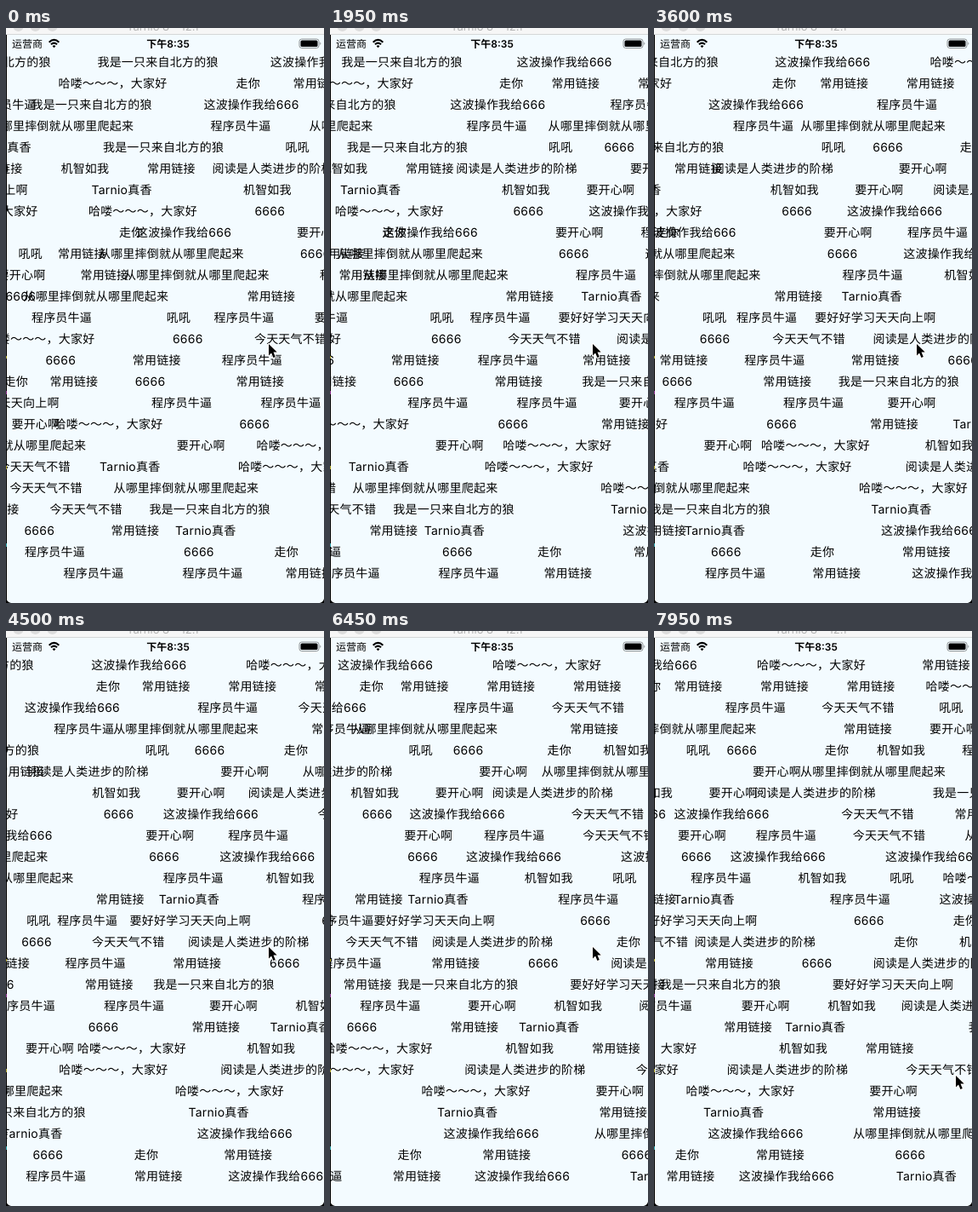
Write an HTML page that moves like this. It is 374 by 675 pixels and loops after 8000 ms.

```html
<!DOCTYPE html>
<html lang="zh-CN">
<head>
<meta charset="utf-8">
<title>弹幕</title>
<style>
  html, body { margin: 0; width: 100%; height: 100%; overflow: hidden; background: #f3fbff; }
  svg { display: block; width: 374px; height: 675px; }
  text {
    font-family: Inter, "Noto Sans CJK SC", "Noto Sans CJK", sans-serif;
    fill: #000; white-space: pre; text-rendering: geometricPrecision;
  }
  #lanes text { font-size: 14px; letter-spacing: .24px; }
</style>
</head>
<body>
<svg viewBox="0 0 374 675" xmlns="http://www.w3.org/2000/svg">
  <defs><clipPath id="screen"><rect x="1" y="8" width="373" height="667"/></clipPath></defs>
  <rect width="374" height="675" fill="#f3fbff"/>

  <!-- window bar -->
  <rect width="374" height="7.5" fill="#f6f6f6"/>
  <rect y="7" width="374" height="1" fill="#d5d7d8"/>
  <g fill="#dcdcdc">
    <circle cx="14.5" cy="-2" r="6"/><circle cx="34.5" cy="-2" r="6"/><circle cx="54.5" cy="-2" r="6"/>
  </g>
  <text x="142" y="3" font-size="13" style="fill:#b4b4b4">Tarnio 8 - 12.1</text>

  <g id="lanes" clip-path="url(#screen)"></g>

  <!-- status bar -->
  <text x="7" y="22.5" font-size="12">运营商</text>
  <text x="190.5" y="22.5" font-size="12" font-weight="600" text-anchor="middle">下午8:35</text>
  <g fill="none" stroke="#000" stroke-width="2.2">
    <path d="M50.700 16.700Q56.500 11 62.300 16.700"/>
    <path d="M53 19.300Q56.500 16 60 19.300"/>
  </g>
  <path d="M54.600 21.200Q56.500 19.500 58.400 21.200L56.500 23.200Z"/>
  <rect x="345" y="13" width="23" height="10.5" rx="2.7" fill="none" stroke="#8c9092"/>
  <rect x="346.5" y="14.5" width="20" height="7.5" rx="1.5"/>
  <path d="M369.300 16.500Q371.500 18.200 369.300 20Z" fill="#8c9092"/>

  <!-- screen edge -->
  <rect y="8" width="1" height="667"/>
  <path d="M0 669Q1 674 6 675H0ZM374 670Q373 674 369 675H374Z"/>
  <g>
    <rect y="385" width="1" height="3" fill="#a89b20"/>
    <rect y="426" width="1" height="4" fill="#8a2a8a"/>
    <rect y="514" width="1" height="4" fill="#a89b20"/>
    <rect y="605" width="1" height="4" fill="#2aa0a8"/>
  </g>

  <path id="cursor" d="M0 0V13.500L3.100 10.500L5.400 16L7.800 15L5.500 9.600H9.700Z"
        stroke="#fff" stroke-width="2" stroke-linejoin="round" paint-order="stroke"/>
</svg>
<script>
const LOOP = 8000, STEP = 150;

const phrases = {
  A: '我是一只来自北方的狼', B: '这波操作我给666', C: '哈喽～～～，大家好',
  D: '走你', E: '常用链接', F: '程序员牛逼', G: '从哪里摔倒就从哪里爬起来',
  H: '吼吼', I: '6666', J: '机智如我', K: '阅读是人类进步的阶梯',
  L: 'Tarnio真香', M: '要开心啊', N: '今天天气不错', O: '要好好学习天天向上啊'
};

// One string per lane: phrase key and its left edge at time zero.
const lanes = [
  'A-89 A108 B311.3 C493.5 E629.7',
  'C62 D271 E338 E439.5 E541 C692',
  'F-35 A30 B233 F410 N535 H626.5',
  'G-20 F241 G357 E537.5 M638.5',
  'L-41 A114.5 H329 I400 D492 J576.5 F688.5',
  'E-37 J65 E166.5 K243 M430.5 G579.5',
  'O-116 L101 J279.5 M379 K502.5 A712',
  'C-90 C97.5 I293 B396 N558 E668',
  'D133.5 B153.5 M342.5 F446 N571.5 G773',
  'H15 E61.5 G109.5 I346.5 B462.3 B644.5',
  'M-10 E88 G139.5 F369.5 J484 H568.7 C712',
  'I0 G21 E284 L384.3 F533 B708',
  'F30.5 H189.3 F245 O363.3 I549.5 D643',
  'C-23 I196.5 N292.5 K431.7 D573.3 J673.5',
  'I47 E149.3 F254.3 E374.5 I488.3 K642',
  'D-2 E52 I152.3 E271 A391 O594',
  'O-79 F171.7 F300 M417.3 J518.7 K675',
  'M7 C57 I275 E396.7 L515 A754',
  'G-76 M201.3 C295 J461.5 E563.3',
  'N-9 L110.7 C273.5 K470 N634',
  'N5 G127 C410 M567.7',
  'E-41 N52 A169 L419 E571.7',
  'I22 E124 L199.7 B436 G641.5',
  'F22.5 I209.7 D316 E434.5 I598',
  'F68 F208 E329 B472.3 L645.7'
];

const group = document.getElementById('lanes');
const cursor = document.getElementById('cursor');

function addItem(code, lane) {
  const label = phrases[code[0]];
  const node = document.createElementNS('http://www.w3.org/2000/svg', 'text');
  node.textContent = label;
  node.setAttribute('y', 45 + lane * 25);
  group.append(node);
  // Longer phrases travel faster.
  return { node, x: Number(code.slice(1)) - 0.6, speed: 33.65 + 1.46 * label.length };
}

const items = lanes.flatMap((row, lane) => row.split(' ').map(code => addItem(code, lane)));

function ease(t, from, to) {
  const p = Math.min(1, Math.max(0, (t - from) / (to - from)));
  return p * p * (3 - 2 * p);
}

function draw(ms) {
  const t = Math.floor(ms / STEP) * STEP;
  for (const { node, x, speed } of items) {
    node.setAttribute('x', (x - speed * t / 1000).toFixed(2));
  }
  const aside = ease(t, 6450, 7050), down = ease(t, 7200, 7800);
  const cx = 309 + 47 * aside - down;
  const cy = 371 + 15 * aside + 136 * down;
  cursor.setAttribute('transform', `translate(${cx} ${cy})`);
}

const start = performance.now();
function tick() {
  draw((performance.now() - start) % LOOP);
  requestAnimationFrame(tick);
}
tick();
</script>
</body>
</html>
```
